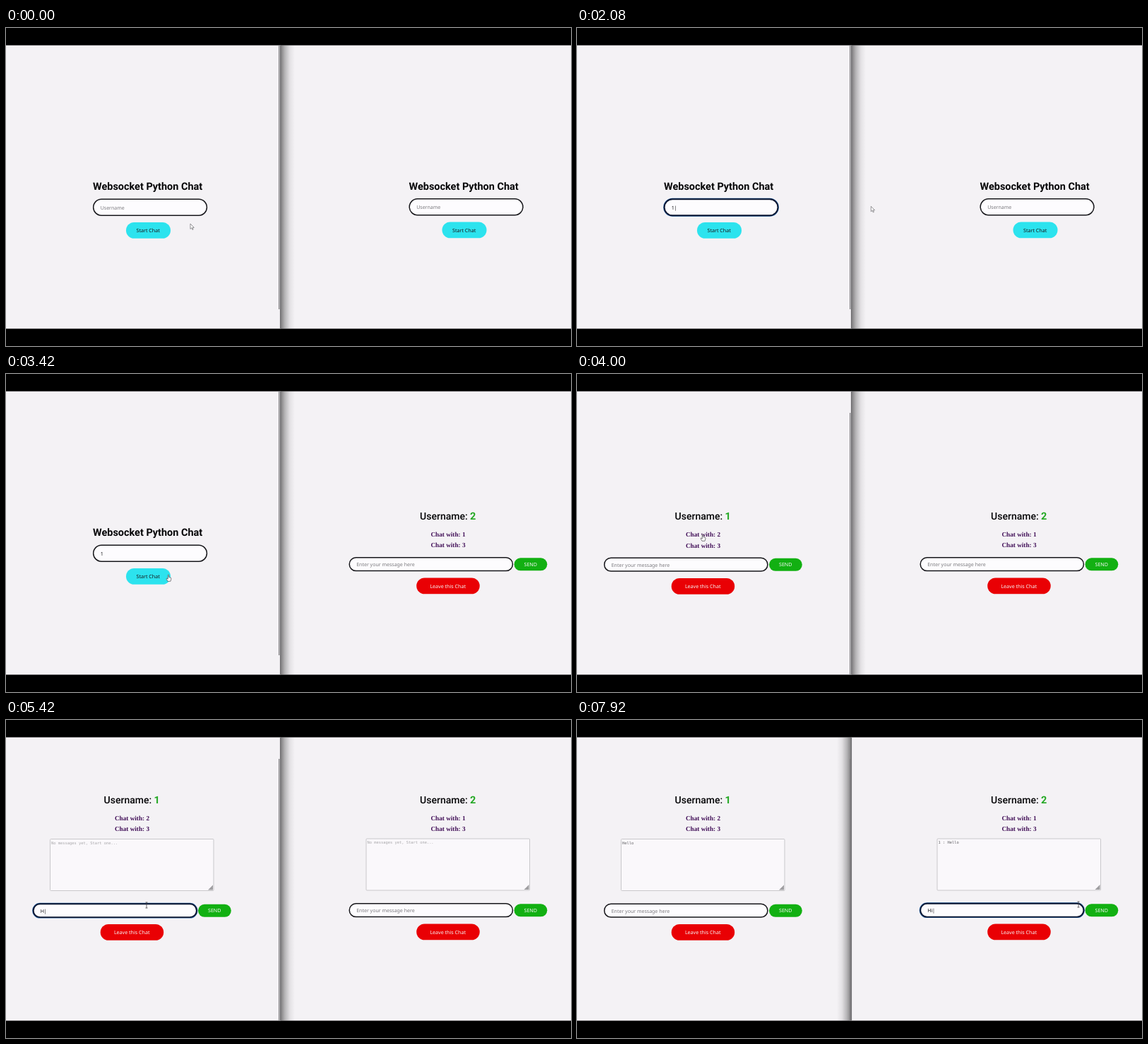
These frames come from a looping animation (800x450 px, 8000 ms). An HTML page:

```html
<!DOCTYPE html>
<html lang="en">
<head>
<meta charset="utf-8">
<title>Websocket Python Chat</title>
<style>
  html, body { margin: 0; width: 100%; height: 100%; overflow: hidden; background: #000; }
  svg { display: block; width: 100%; height: 100%; }
  text { font-family: "Noto Sans", "Open Sans", sans-serif; font-size: 7.1px; fill: #18181b; white-space: pre; text-rendering: geometricPrecision; }
  .mid { text-anchor: middle; }
  .title, .user, .num { font-family: Roboto, sans-serif; font-weight: 700; fill: #050507; }
  .title { font-size: 14.46px; }
  .user { font-size: 14px; font-weight: 500; }
  .num { font-size: 14.4px; fill: #23a823; }
  .link { font: 700 9.2px "Liberation Serif", serif; fill: #421058; }
  .log { font: 5.4px "DejaVu Sans Mono", monospace; fill: #606064; }
  .empty { fill: #a9a8ab; }
  .hint { font-size: 7px; fill: #7b7a7e; }
  .light { fill: #f6f6f6; }
  .field { fill: #fdfcfe; stroke: #17171b; stroke-width: 1.5; }
  .halo { fill: none; stroke: #2c67a6; stroke-width: 3; }
  .focus { stroke: #0b1630; stroke-width: 1.9; }
  .area { fill: #faf8fb; stroke: #c9c8cb; stroke-width: 1; }
</style>
</head>
<body>
<svg viewBox="0 0 800 450" preserveAspectRatio="none">
  <defs>
    <linearGradient id="shade">
      <stop offset="0" stop-color="#000" stop-opacity=".48"/>
      <stop offset=".3" stop-color="#000" stop-opacity=".25"/>
      <stop offset=".65" stop-color="#000" stop-opacity=".07"/>
      <stop offset="1" stop-color="#000" stop-opacity="0"/>
    </linearGradient>
  </defs>
  <rect width="800" height="450"/>
  <rect y="24.5" width="800" height="401" fill="#f4f2f5"/>
  <rect id="shadow" y="24.5" width="20" height="401" fill="url(#shade)"/>
  <rect id="thumb" x="386" width="1.3" fill="#818083"/>
  <rect x="387.9" y="24.5" width="1.2" height="401" fill="#6d6c6f"/>
  <g id="left"></g>
  <g id="right" transform="translate(447.5 -.5)"></g>
  <g id="pointer">
    <path id="arrow" d="M0 0V7.4L1.8 5.8L3 8.5L4.1 8L3 5.4H5.3Z" fill="#fff" stroke="#68676b" stroke-width=".7"/>
    <path id="beam" d="M-1.5-4H1.5M0-4V4M-1.5 4H1.5" fill="none" stroke="#444347" stroke-width=".8"/>
    <path id="hand" d="M-.7 .4Q0-.5.7 .4V3.6L3.6 4.4Q4.2 5 3.7 7L3 9.3H-1L-2.7 6.3Q-3.2 5-2 5.2L-.7 6.2Z" fill="#fff" stroke="#4b4a4e" stroke-width=".7"/>
  </g>
</svg>
<script>
const LOOP = 8000, DX = 447.5;
const $ = id => document.getElementById(id);

// time, x, y of the mouse
const path = [
  [0, 261, 277], [300, 260, 275], [950, 239, 251], [1800, 238, 251],
  [2400, 632, 254], [2760, 632, 254], [2960, 652, 285], [3060, 650, 285],
  [3400, 230, 284], [3560, 229, 284], [3900, 178, 227], [4090, 178, 227],
  [4420, 611, 226], [4620, 611, 226], [4950, 199, 262], [5830, 199, 262],
  [6150, 291, 268], [6600, 291, 268], [7200, 710, 261], [8000, 710, 261]
];

// time and value of each hard change
const active = [[0, 'left'], [2400, 'right'], [3400, 'left'], [4480, 'right'], [4980, 'left'], [7250, 'right']];
const panes = {
  left: {
    me: 1, peer: 2, sent: 'Hello',
    page: [[0, 'login'], [3560, 'lobby'], [4080, 'chat']],
    focus: [[0, false], [1000, true], [2400, false], [4980, true], [6250, false]],
    input: [[0, ''], [1750, '1'], [3560, ''], [5330, 'H'], [5500, 'He'], [5580, 'Hel'], [5670, 'Hell'], [5750, 'Hello'], [6250, '']]
  },
  right: {
    me: 2, peer: 1, sent: '1 : Hello',
    page: [[0, 'login'], [3060, 'lobby'], [4580, 'chat']],
    focus: [[0, false], [2480, true], [3000, false], [7250, true]],
    input: [[0, ''], [2830, '2'], [3060, ''], [7670, 'H'], [7830, 'Hi']]
  }
};
const SENT_AT = 6250;

const at = (steps, t) => steps.findLast(s => s[0] <= t)[1];

function mouse(t) {
  const i = path.findIndex(p => p[0] > t);
  const [t0, x0, y0] = path[i - 1], [t1, x1, y1] = path[i];
  const u = (t - t0) / (t1 - t0), e = u * u * (3 - 2 * u);
  return [x0 + (x1 - x0) * e, y0 + (y1 - y0) * e];
}

const text = (x, y, cls, s) => `<text x="${x}" y="${y}" class="${cls}">${s}</text>`;
const pill = (x, y, w, h, attrs) => `<rect x="${x}" y="${y}" width="${w}" height="${h}" rx="${h / 2}" ${attrs}/>`;

function field(x, y, w, h, value, hint, focused) {
  const base = y + h / 2 + 2.9, tx = x + 10;
  let out = focused ? pill(x, y, w, h, 'class="halo"') : '';
  out += pill(x, y, w, h, `class="field${focused ? ' focus' : ''}"`);
  out += value ? text(tx, base, '', value + (focused ? '<tspan dx="-.3" font-weight="300">|</tspan>' : '')) : text(tx, base, 'hint', hint);
  if (focused && !value) out += `<rect x="${tx - .2}" y="${base - 7}" width=".7" height="8.5"/>`;
  return out;
}

const login = (value, focused) =>
  text(123, 229, 'title', 'Websocket Python Chat') +
  field(123.7, 242.3, 160.7, 22.9, value, 'Username', focused) +
  pill(170, 275, 63, 22.8, 'fill="#2ce3ee"') +
  text(201.2, 289.3, 'mid', 'Start Chat');

function chat(pane, page, value, focused, sent) {
  const dy = page === 'lobby' ? 88.3 : 0;
  let out = text(138.6, 118 + dy, 'user', 'Username:') + text(209.5, 118 + dy, 'num', pane.me) +
    text(178.5, 142 + dy, 'link mid', 'Chat with: ' + pane.peer) +
    text(178.5, 157.3 + dy, 'link mid', 'Chat with: 3');
  if (page === 'chat') {
    out += '<rect x="62.5" y="168.5" width="231.5" height="73" rx="1" class="area"/>' +
      '<path d="M293 233.5V240.5H286Z" fill="#a09fa2"/>' +
      (sent ? text(64, 175.6, 'log', pane.sent) : text(64, 175.6, 'log empty', 'No messages yet, Start one...'));
  }
  return out + field(38.7, 260.3, 231.2, 18.8, value, 'Enter your message here', focused) +
    pill(272, 260.8, 46.8, 18, 'fill="#12b012"') + text(295.2, 272.4, 'mid light', 'SEND') +
    pill(133.7, 289, 89.5, 22.8, 'fill="#e90004"') + text(178.2, 303.2, 'mid light', 'Leave this Chat');
}

const inside = (x, y, [l, t, r, b]) => x >= l && x <= r && y >= t && y <= b;
const zones = {
  login: { beam: [[124, 242, 285, 265]], hand: [[170, 275, 233, 298]] },
  lobby: { beam: [[38, 260, 270, 280]], hand: [[154, 222, 203, 250], [272, 261, 319, 279], [134, 289, 223, 312]] },
  chat: { beam: [[38, 260, 270, 280], [62, 168, 294, 242]], hand: [[154, 134, 203, 161], [272, 261, 319, 279], [134, 289, 223, 312]] }
};

function pointerKind(x, y, pages) {
  const onRight = x > 388;
  const zone = zones[pages[onRight ? 'right' : 'left']];
  const hit = kind => zone[kind].some(box => inside(onRight ? x - DX : x, y, box));
  return hit('beam') ? 'beam' : hit('hand') ? 'hand' : 'arrow';
}

const drawn = {};
function render(t) {
  const pages = {};
  for (const side in panes) {
    const pane = panes[side];
    const page = pages[side] = at(pane.page, t);
    const value = at(pane.input, t), focused = at(pane.focus, t);
    const html = page === 'login' ? login(value, focused) : chat(pane, page, value, focused, t >= SENT_AT);
    if (drawn[side] !== html) $(side).innerHTML = drawn[side] = html;
  }
  $('shadow').setAttribute('transform', at(active, t) === 'left' ? 'translate(389 0)' : 'translate(388 0) scale(-1 1)');
  const short = pages.left === 'login';
  $('thumb').setAttribute('y', short ? 24.5 : 55);
  $('thumb').setAttribute('height', short ? 373.5 : 370.5);

  const [x, y] = mouse(t), kind = pointerKind(x, y, pages);
  $('pointer').setAttribute('transform', `translate(${x} ${y})`);
  for (const id of ['arrow', 'beam', 'hand']) $(id).style.display = id === kind ? '' : 'none';
}

const start = performance.now();
function tick() {
  render((performance.now() - start) % LOOP);
  requestAnimationFrame(tick);
}
tick();
</script>
</body>
</html>
```
